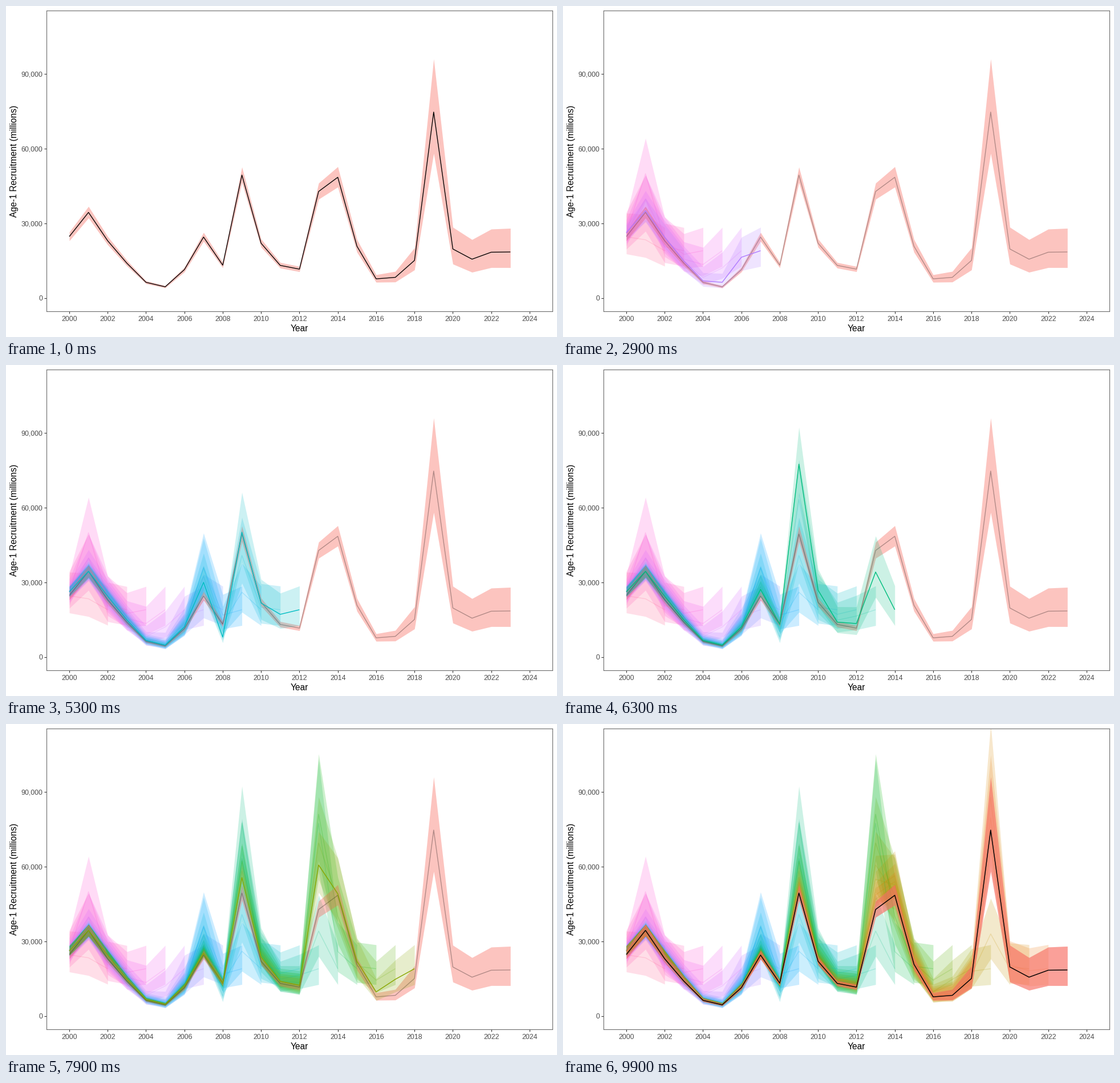
Recreate the animation shown at these times as a matplotlib script. Size 966 by 580 pixels, loop 10 s.

```python
import matplotlib.pyplot as plt
import numpy as np
from matplotlib.animation import FuncAnimation

W, H, DPI = 966, 580, 100
PX = 72 / DPI
FRAME_MS, LOOP_MS = 100, 10000
FIRST, LAST = 2000, 2023
LEFT, TOP, RIGHT, BOTTOM = 71, 8, 958, 535
X0, X_STEP = 111, 33.62       # pixel of the first year, pixels per year
Y0, Y_STEP = 511.7, 4.3625    # pixel of zero, pixels per thousand million
plt.rcParams["font.family"] = "Liberation Sans"

# Recruitment as finally assessed, one point per year.
FINAL = np.array([24.7, 34.4, 23, 14, 6.3, 4.5, 11.4, 24.5, 13.2, 49.4, 22, 13.1,
                  11.6, 42.8, 48.5, 20.8, 7.7, 8.3, 15.1, 74.7, 19.7, 15.6, 18.4, 18.5])
PRIOR = 19     # estimate for a year class not yet observed
DRIFT = .06    # usual log excess of earlier assessments
# Year classes that were misjudged: age at the peak, log excess, years to fade.
MISJUDGED = {2001: (3, .4, 1), 2007: (2, .55, 3), 2008: (4, -.5, .4),
             2009: (5, .45, 3), 2010: (4, .2, 4), 2013: (1.5, 1.12, 3),
             2014: (6, .15, 3), 2019: (2, .55, .6)}


def excess(cohort, age):
    """Log error of a year class: quick rise to a peak, then a slow fade."""
    if cohort not in MISJUDGED:
        return DRIFT
    peak, size, fade = MISJUDGED[cohort]
    past = age - peak
    return size * np.where(past < 0, np.exp(-(past / 1.3) ** 2),
                           np.exp(-np.maximum(past, 0) / fade))


def estimates(year):
    """Years, centre and band limits of one assessment."""
    years = np.arange(FIRST, year + 1)
    age = year - years
    mid = FINAL[:len(years)]
    if year < LAST:
        ignorance = np.exp(-.4 * age ** 2)
        error = np.array([excess(c, a) for c, a in zip(years, age)])
        mid = PRIOR ** ignorance * (mid * np.exp(error)) ** (1 - ignorance)
    # Young and small year classes are the least certain.
    half_age = 3.8 + .08 * (year - 2002)
    spread = .075 + .34 / (1 + np.exp((age - half_age) / 1.4))
    spread *= (20 / mid) ** .2
    return years, mid, mid * np.exp(-spread), mid * np.exp(spread)


def hcl(hue, chroma=110, lum=63):
    """Polar LUV colour as sRGB."""
    a = np.radians(hue)
    u = chroma * np.cos(a) / (13 * lum) + .19784
    v = chroma * np.sin(a) / (13 * lum) + .46834
    y = ((lum + 16) / 116) ** 3
    x = 9 * y * u / (4 * v)
    z = y * (12 - 3 * u - 20 * v) / (4 * v)
    rgb = np.array([3.2406 * x - 1.5372 * y - .4986 * z,
                    -.9689 * x + 1.8758 * y + .0415 * z,
                    .0557 * x - .2040 * y + 1.0570 * z]).clip(0, 1)
    return tuple(np.where(rgb <= .0031308, 12.92 * rgb,
                          1.055 * rgb ** (1 / 2.4) - .055).clip(0, 1))


def run_color(year):
    return hcl(15 + 360 / 22 * (LAST - year))


fig = plt.figure(figsize=(W / DPI, H / DPI), dpi=DPI, facecolor="white")
ax = fig.add_axes([LEFT / W, 1 - BOTTOM / H, (RIGHT - LEFT) / W, (BOTTOM - TOP) / H])
ax.set_xlim(FIRST + (LEFT - X0) / X_STEP, FIRST + (RIGHT - X0) / X_STEP)
ax.set_ylim((Y0 - BOTTOM) / Y_STEP, (Y0 - TOP) / Y_STEP)
ax.set_xticks(range(2000, 2025, 2))
ax.set_yticks(range(0, 91, 30), [f"{v * 1000:,}" for v in range(0, 91, 30)])
ax.tick_params(length=4 * PX, width=1.1 * PX, pad=3 * PX, color="#333333",
               labelcolor="#4d4d4d", labelsize=12.4 * PX)
ax.tick_params(axis="x", pad=4 * PX)
for spine in ax.spines.values():
    spine.set(color="#6a6a6a", linewidth=1.1 * PX)
title = dict(size=15.5 * PX, ha="center", va="baseline", rotation_mode="anchor")
fig.text(514.5 / W, 1 - 569.5 / H, "Year", **title)
fig.text(19 / W, 1 - 272 / H, "Age-1 Recruitment (millions)", rotation=90, **title)


def add_run(year, alpha, color):
    years, mid, low, high = estimates(year)
    band = ax.fill_between(years, low, high, color=run_color(year), alpha=alpha, lw=0)
    line, = ax.plot(years, mid, color=color, solid_capstyle="butt")
    return band, line


base_band, base_line = add_run(LAST, .4, "black")
base_band.set_zorder(3)
base_line.set_zorder(4)
runs = {y: add_run(y, .2, run_color(y)) for y in range(2002, LAST)}
runs[LAST] = add_run(LAST, .4, "black")

# Each assessment appears in turn, the first one after the opening view.
STARTS = dict(zip(runs, [*range(400, 5000, 500), *range(5300, 5900, 500),
                         *range(6300, LOOP_MS, 400)]))


def draw(frame):
    t = frame * FRAME_MS
    current = max((y for y, start in STARTS.items() if start <= t), default=None)
    opening = current is None
    base_line.set(alpha=1 if opening else .3, linewidth=1.35 * PX)
    for year, (band, line) in runs.items():
        shown = not opening and year <= current
        active = year == current
        band.set(visible=shown, zorder=5 if active else 1)
        line.set(visible=shown, zorder=6 if active else 2,
                 alpha=1 if active else .2, linewidth=1.4 * PX)
    return []


anim = FuncAnimation(fig, draw, frames=LOOP_MS // FRAME_MS, interval=FRAME_MS,
                     repeat=True, repeat_delay=0, blit=False)
plt.show()
```
